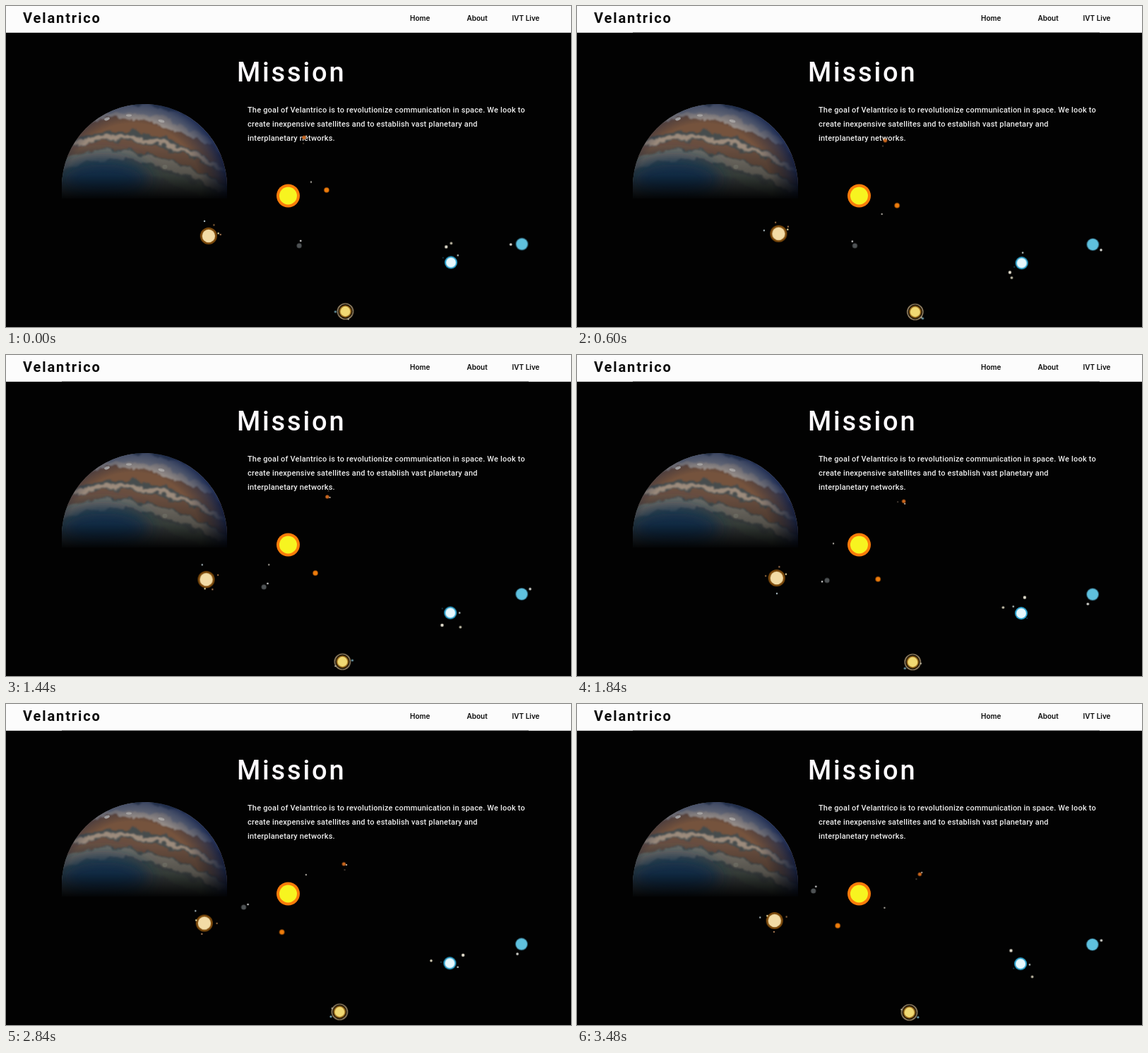
These frames come from a looping animation (800 px wide and 455 px high, 3.52 s). An HTML page:

```html
<!DOCTYPE html>
<html lang="en">
<head>
<meta charset="utf-8">
<title>Mission</title>
<style>
html, body { margin: 0; width: 100%; height: 100%; overflow: hidden; background: #020202; }
svg { display: block; width: 800px; height: 455px; }
text { white-space: pre; }
.head { font: 700 20px Roboto, sans-serif; letter-spacing: 1.9px; fill: #0a0a0a; }
.nav { font: 600 10px Inter, sans-serif; fill: #0a0a0a; }
.title { font: 500 38px Roboto, sans-serif; letter-spacing: 2.8px; fill: #fdfafd; }
.copy { font: 500 11px Roboto, sans-serif; letter-spacing: .18px; fill: #ececec; }
.orbit { animation: orbit 3520ms steps(88) infinite; }
.edge { animation: edge 3520ms step-end infinite; }
@keyframes orbit {
  from { transform: rotate(var(--a)) translateX(var(--r)) rotate(calc(-1 * var(--a))); }
  to { transform: rotate(var(--b)) translateX(var(--r)) rotate(calc(-1 * var(--b))); }
}
@keyframes edge {
  from { opacity: 0; }
  1.136% { opacity: 1; }
}
</style>
</head>
<body>
<svg viewBox="0 0 800 455">
  <defs>
    <clipPath id="dome"><path d="M79 273V256A117 117 0 0 1 313 256V273Z"/></clipPath>
    <filter id="swirl" x="-10%" y="-10%" width="120%" height="120%">
      <feTurbulence type="fractalNoise" baseFrequency=".06" numOctaves="3" seed="4"/>
      <feDisplacementMap in="SourceGraphic" scale="16" xChannelSelector="R" yChannelSelector="G"/>
      <feGaussianBlur stdDeviation=".8"/>
    </filter>
    <filter id="soft" x="-40%" y="-40%" width="180%" height="180%"><feGaussianBlur stdDeviation="12"/></filter>
    <linearGradient id="fade" x1="0" y1="0" x2="0" y2="1">
      <stop offset=".45" stop-opacity="0"/>
      <stop offset=".75" stop-opacity=".3"/>
      <stop offset="1" stop-opacity=".93"/>
    </linearGradient>
    <radialGradient id="rim" gradientUnits="userSpaceOnUse" cx="180" cy="263" r="134">
      <stop offset=".72" stop-color="#0a1530" stop-opacity="0"/>
      <stop offset=".9" stop-color="#14244a" stop-opacity=".55"/>
      <stop offset="1" stop-color="#10204c" stop-opacity=".9"/>
    </radialGradient>
  </defs>

  <rect width="800" height="455" fill="#020202"/>
  <rect width="800" height="38" fill="#fcfcfc"/>
  <rect y="37" width="800" height="1" fill="#d8d8d8"/>
  <rect class="edge" x="79" y="37" width="661" height="1" fill="#8a8a8a"/>
  <text class="head" x="24" y="24">Velantrico</text>
  <text class="nav" x="572" y="20.5">Home</text>
  <text class="nav" x="652.5" y="20.5">About</text>
  <text class="nav" x="716.5" y="20.5">IVT Live</text>

  <g clip-path="url(#dome)">
    <rect x="79" y="139" width="234" height="134" fill="#464c4d"/>
    <g filter="url(#swirl)" fill="none">
      <path d="M90 165Q190 118 310 195" stroke="#85858c" stroke-width="18"/>
      <path d="M82 178Q180 124 312 206" stroke="#a79c93" stroke-width="9"/>
      <path d="M76 192Q170 132 314 222" stroke="#75523e" stroke-width="18"/>
      <path d="M74 207Q170 152 314 236" stroke="#9c8b7c" stroke-width="6"/>
      <path d="M74 218Q165 164 314 248" stroke="#6a5040" stroke-width="13"/>
      <path d="M74 230Q160 180 310 262" stroke="#77736a" stroke-width="12"/>
      <path d="M74 243Q160 198 300 275" stroke="#4c5450" stroke-width="13"/>
    </g>
    <ellipse cx="138" cy="246" rx="64" ry="30" fill="#183a5e" filter="url(#soft)"/>
    <g fill="#d8d0c4">
      <ellipse cx="143" cy="160" rx="4" ry="2" transform="rotate(-20 143 160)"/>
      <ellipse cx="174" cy="155" rx="4" ry="1.7"/>
      <ellipse cx="220" cy="163" rx="4.5" ry="2" transform="rotate(15 220 163)"/>
      <ellipse cx="225" cy="228" rx="3.5" ry="3" fill="#858478"/>
    </g>
    <rect x="79" y="139" width="234" height="134" fill="url(#rim)"/>
    <rect x="79" y="139" width="234" height="134" fill="url(#fade)"/>
  </g>

  <text class="title" x="327" y="107">Mission</text>
  <g class="copy">
    <text x="342" y="151">The goal of Velantrico is to revolutionize communication in space. We look to</text>
    <text x="342" y="171">create inexpensive satellites and to establish vast planetary and</text>
    <text x="342" y="191">interplanetary networks.</text>
  </g>

  <circle cx="399.5" cy="269" r="16.5" fill="#fb7c0a"/>
  <circle cx="399.5" cy="269" r="12.5" fill="#f7f420"/>
  <g id="system"></g>
</svg>
<script>
const LOOP = 3.52;
const system = document.getElementById('system');

function add(parent, tag, attrs) {
  const el = document.createElementNS('http://www.w3.org/2000/svg', tag);
  for (const key in attrs) el.setAttribute(key, attrs[key]);
  return parent.appendChild(el);
}

// Circular path: radius, start angle in degrees, degrees per second.
function orbit(parent, x, y, radius, start, speed) {
  const hub = add(parent, 'g', { transform: `translate(${x} ${y})` });
  return add(hub, 'g', {
    class: 'orbit',
    style: `--r:${radius}px;--a:${start}deg;--b:${start + speed * LOOP}deg`
  });
}

function disc(parent, r, fill) {
  return add(parent, 'circle', { r, fill });
}

// Discs are [radius, colour]; moons are [radius, start, speed, size, colour].
const planets = [
  { at: [401, 272], path: [38.3, -36, 121.3], discs: [[1.2, '#a9a49c']] },
  { at: [400.5, 270], path: [54.2, -9.7, 38.8], discs: [[3.8, '#a85406'], [3, '#ee7d0c']] },
  { path: [69.6, 80.8, 29.94], discs: [[3.5, '#4e5254']],
    moons: [[7.2, 287, 521, 1.3, '#d2d2d2']] },
  { path: [86.6, -78, 16.64], discs: [[2.6, '#c9651c']],
    moons: [[3.8, -32, 1032, 1.1, '#e0cdb8'], [8.5, 96, 629, .8, '#97836f']] },
  { path: [129.4, 154.9, 2.56], shift: [1, 0], discs: [[12, '#7c4a0c'], [9.2, '#f3dca6']],
    moons: [
      [13.3, 344, 582.5, 1.2, '#f5e6a8'],
      [16.8, 293, 531, 1.2, '#91683f'],
      [16, 353, 547, 1.2, '#a07450'],
      [22, 252, 500, 1.2, '#a9bac0']
    ] },
  { path: [179, 64.7, 1], ring: 11, discs: [[9, '#85560f'], [7.2, '#f1d973']],
    moons: [[14.1, 178, 371, 1.6, '#6f9fae'], [11.8, 69, 555, 1.2, '#b5b09c']] },
  { path: [244.2, 22.26, .345], shift: [-.5, -1.2], discs: [[9, '#2ba3cf'], [7, '#e6f8fd']],
    moons: [
      [21.8, 253.5, 408, 2.2, '#ddd8c8'],
      [26, 272, 349.7, 1.8, '#d2cdb6'],
      [13.6, 319, 532, 1.3, '#b9c3c0'],
      [12, 207, 498, .8, '#2d6f86']
    ] },
  { path: [333.2, 11.51, .175], shift: [-1, 0], discs: [[9, '#28596d'], [8, '#5fc1de']],
    moons: [[14.8, 178, 356, 1.8, '#dcdcd6']] }
];

for (const { at = [404, 271], path, shift = [0, 0], discs, ring, moons = [] } of planets) {
  const planet = orbit(system, ...at, ...path);
  for (const [r, fill] of discs) disc(planet, r, fill);
  if (ring) add(planet, 'circle', { r: ring, fill: 'none', stroke: '#c3aa82', 'stroke-width': 1.2 });
  for (const [radius, start, speed, size, fill] of moons) {
    disc(orbit(planet, ...shift, radius, start, speed), size, fill);
  }
}
</script>
</body>
</html>
```
